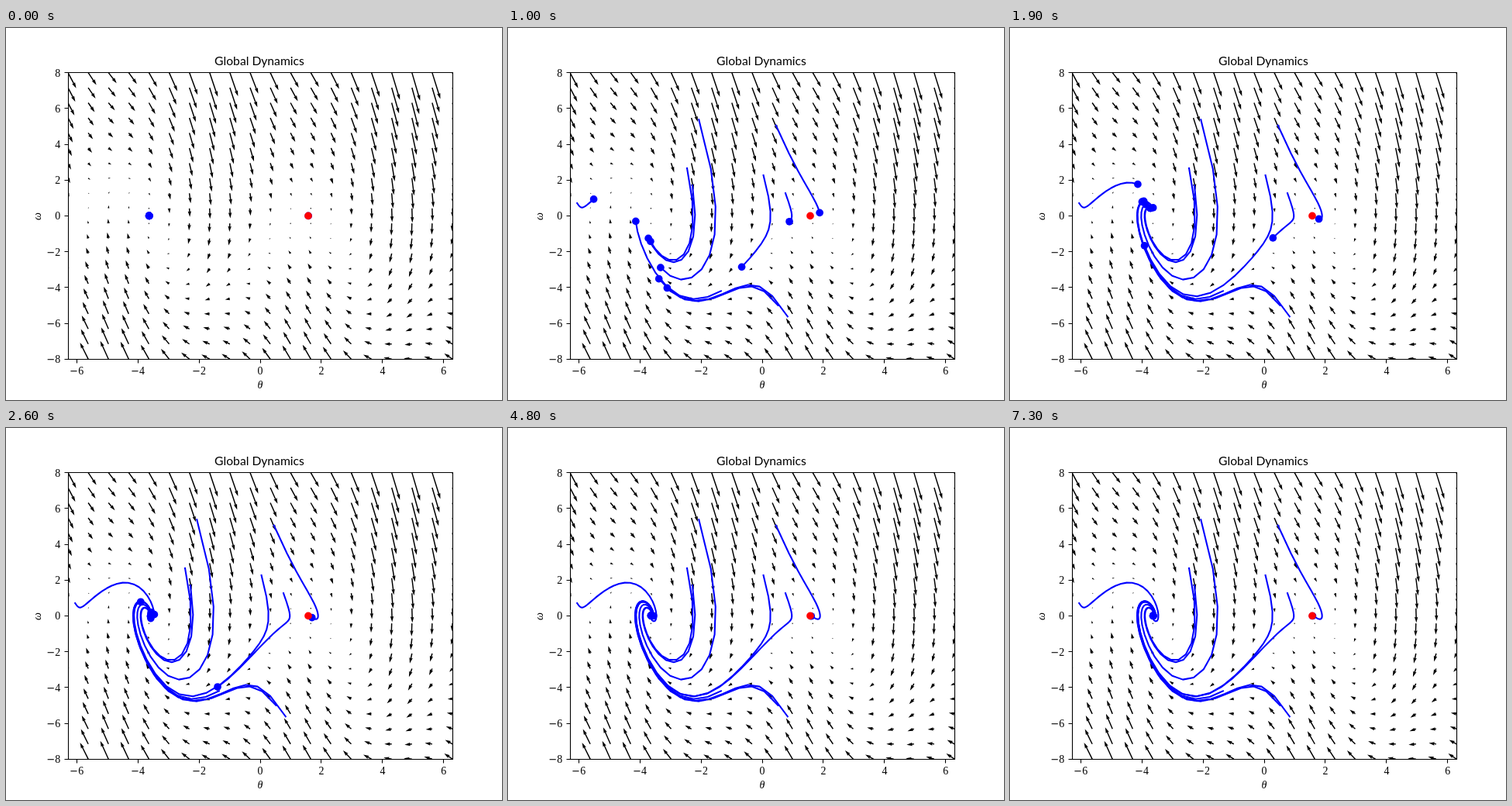
Animation of 640x480 px, one loop 9900 ms. Source, as an HTML page:

```html
<!DOCTYPE html>
<html lang="en">
<head>
<meta charset="utf-8">
<title>Global Dynamics</title>
<style>
  html, body { margin: 0; width: 100%; height: 100%; overflow: hidden; background: #fff; }
  svg { display: block; width: 640px; height: 480px; }
  .tick { font: 13.9px "Liberation Serif", serif; }
  .minus { font: 13px "DejaVu Sans", sans-serif; }
  .title { font: 15.7px Lato, sans-serif; }
  .name { font: italic 14px "Liberation Serif", serif; }
  .axes { fill: none; stroke: #000; stroke-width: 1.1; }
  .trail { fill: none; stroke: #00f; stroke-width: 2.08; stroke-linejoin: round; stroke-linecap: square; }
</style>
</head>
<body>
<svg id="plot" viewBox="0 0 640 480" xmlns="http://www.w3.org/2000/svg"></svg>
<script>
const LOOP = 9900, STEP = 100, DT = 0.1, COUNT = 99;
const LEFT = 80, TOP = 57.6, WIDTH = 496, HEIGHT = 369.6;
const GRID = 20, TURN = 2 * Math.PI, REACH = 8;
const SX = WIDTH / (2 * TURN), SY = HEIGHT / (2 * REACH);
const GOAL = Math.PI / 2, GRAVITY = 9.81, KP = 1, KD = 3;

// starting angle and speed of each run
const STARTS = [
  [-6.05, 0.71], [-2.457, 2.66], [-2.28, 1.7], [-2.07, 5.37], [-1.345, -4.2],
  [0.83, -5.62], [0.52, -5], [0.04, 2.27], [0.76, 1.27], [0.45, 5.05]
];

const px = a => LEFT + WIDTH / 2 + a * SX;
const py = w => TOP + HEIGHT / 2 - w * SY;
const accel = (a, w) => GRAVITY * (Math.sin(a) - 1) - KP * (a - GOAL) - KD * w;

const svg = document.getElementById("plot");
function add(tag, attrs, parent = svg) {
  const el = document.createElementNS("http://www.w3.org/2000/svg", tag);
  for (const key in attrs) el.setAttribute(key, attrs[key]);
  parent.appendChild(el);
  return el;
}
function label(text, x, y, cls, anchor = "middle", extra = {}) {
  const el = add("text", { x, y, class: cls, "text-anchor": anchor, ...extra });
  el.textContent = text;
  return el;
}

// classic Runge-Kutta step
function advance([a, w], h) {
  const k1 = accel(a, w);
  const w2 = w + h / 2 * k1, k2 = accel(a + h / 2 * w, w2);
  const w3 = w + h / 2 * k2, k3 = accel(a + h / 2 * w2, w3);
  const w4 = w + h * k3, k4 = accel(a + h * w3, w4);
  return [a + h / 6 * (w + 2 * w2 + 2 * w3 + w4), w + h / 6 * (k1 + 2 * k2 + 2 * k3 + k4)];
}
function run(start) {
  const points = [];
  let state = start;
  for (let i = 0; i < COUNT; i++) {
    points.push([px(state[0]), py(state[1])]);
    for (let j = 0; j < 4; j++) state = advance(state, DT / 4);
  }
  return points;
}

// arrow outline, measured in shaft widths
function arrow({ x, y, dx, dy }, size, shaft) {
  const full = Math.hypot(dx, dy);
  const len = full * size / shaft;
  const ux = dx / full, uy = dy / full;
  const r = shaft / 2;
  if (len < 1) return `M${x - r},${y}a${r},${r} 0 1 0 ${shaft},0a${r},${r} 0 1 0 ${-shaft},0z`;
  const k = shaft * Math.min(1, len / 5), end = Math.max(len, 5);
  const shape = [[0, .5], [end - 4.5, .5], [end - 5, 1.5], [end, 0],
                 [end - 5, -1.5], [end - 4.5, -.5], [0, -.5]];
  return "M" + shape.map(([p, q]) =>
    (x + k * (p * ux - q * uy)).toFixed(2) + "," + (y + k * (p * uy + q * ux)).toFixed(2)
  ).join("L") + "z";
}
function field() {
  const list = [];
  for (let i = 0; i < GRID; i++) for (let j = 0; j < GRID; j++) {
    const a = TURN * (2 * i / (GRID - 1) - 1);
    const w = REACH * (2 * j / (GRID - 1) - 1);
    list.push({ x: px(a), y: py(w), dx: w * SX, dy: -accel(a, w) * SY });
  }
  const mean = list.reduce((sum, v) => sum + Math.hypot(v.dx, v.dy), 0) / list.length;
  const size = WIDTH / (1.8 * GRID * mean), shaft = 0.06 / GRID * WIDTH;
  return list.map(v => arrow(v, size, shaft)).join("");
}

function tickLabel(value, x, y, anchor) {
  const el = label("", x, y, "tick", anchor);
  if (value < 0) add("tspan", { class: "minus" }, el).textContent = "\u2212";
  add("tspan", {}, el).textContent = Math.abs(value);
}
function axes() {
  let d = "M80.5,57.5H576.5V427.5H80.5Z";
  for (let v = -8; v <= 8; v += 2) {
    const y = Math.floor(py(v)) + .5;
    d += `M80.5,${y}h-5`;
    tickLabel(v, 70.3, py(v) + 5, "end");
    if (Math.abs(v) > 6) continue;
    const x = Math.floor(px(v)) + .5;
    d += `M${x},427.5v5`;
    tickLabel(v, px(v), 447, "middle");
  }
  add("path", { d, class: "axes" });
  label("Global Dynamics", 327, 48, "title");
  label("θ", 328, 464.5, "name");
  label("ω", 0, 0, "name", "middle", { transform: "translate(44.5 243) rotate(-90)" });
}

const clip = add("clipPath", { id: "inside" }, add("defs", {}));
add("rect", { x: LEFT, y: TOP, width: WIDTH, height: HEIGHT }, clip);
const inner = add("g", { "clip-path": "url(#inside)" });
add("path", { d: field() }, inner);

const runs = STARTS.map(start => ({ points: run(start), trail: add("path", { class: "trail" }, inner) }));
for (const r of runs) r.dot = add("circle", { r: 4.86, fill: "#00f" }, inner);
add("circle", { cx: px(GOAL), cy: py(0), r: 4.86, fill: "#f00" }, inner);
axes();

let shown = -1;
function draw(n) {
  if (n === shown) return;
  shown = n;
  for (const { points, trail, dot } of runs) {
    // with no trail yet the dots rest at the final state
    const [x, y] = points.at(n - 1);
    dot.setAttribute("cx", x);
    dot.setAttribute("cy", y);
    trail.setAttribute("d", n > 1 ? "M" + points.slice(0, n).map(p => p.join()).join("L") : "");
  }
}

const begin = performance.now();
function tick() {
  const t = (performance.now() - begin) % LOOP;
  draw(Math.floor(t / STEP));
  requestAnimationFrame(tick);
}
tick();
</script>
</body>
</html>
```
